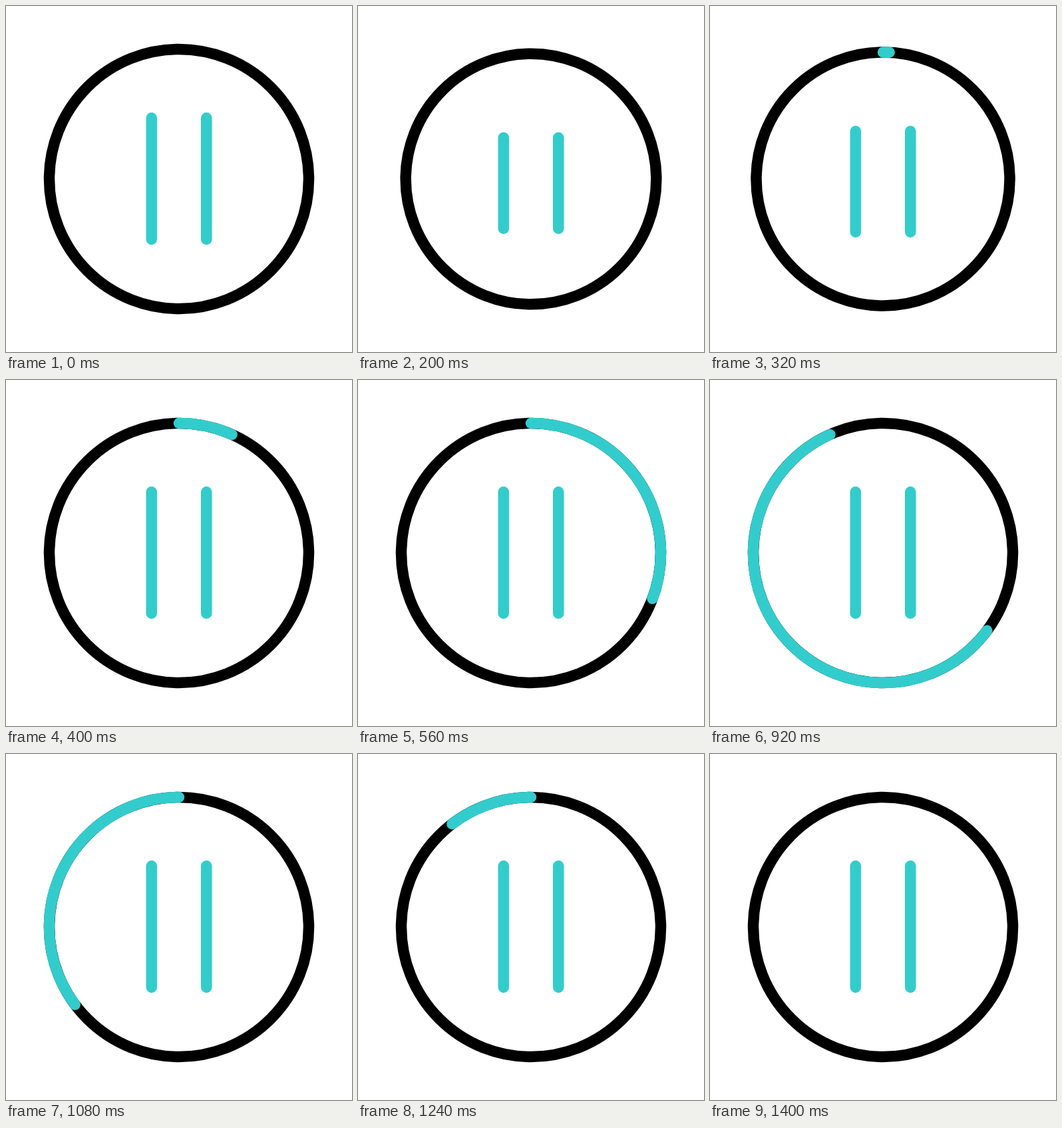
An HTML page that plays this animation: 520 by 520 pixels, repeating every 1.48 s.

```html
<!DOCTYPE html>
<html lang="en">
<head>
<meta charset="utf-8">
<title>Pause button</title>
<style>
  html, body { margin: 0; width: 100%; height: 100%; overflow: hidden; background: #fff; }
  svg { display: block; width: 100%; height: 100%; }
  path, circle { fill: none; stroke-width: 16.5; stroke-linecap: round; }
  .ring { stroke: #000; }
  .accent { stroke: #33cccc; }
</style>
</head>
<body>
<svg viewBox="0 0 520 520">
  <circle class="ring" id="ring" cx="260" cy="260" r="195"/>
  <path class="accent" id="arc"/>
  <path class="accent" id="bars"/>
</svg>
<script>
  const LOOP = 1480, STEP = 40, CENTER = 260, RADIUS = 195;
  const [ring, arc, bars] = ['ring', 'arc', 'bars'].map(id => document.getElementById(id));

  // Smooth ease from 0 to 1 between two times
  function ease(t, from, to) {
    const u = Math.min(1, Math.max(0, (t - from) / (to - from)));
    return u * u * (3 - 2 * u);
  }

  // Point on the ring, as a fraction of a turn clockwise from the top
  function point(turn, r) {
    const a = turn * 2 * Math.PI;
    return `${(CENTER + r * Math.sin(a)).toFixed(3)} ${(CENTER - r * Math.cos(a)).toFixed(3)}`;
  }

  function draw(t) {
    const press = ease(t, 120, 240) - ease(t, 240, 400);
    const r = RADIUS - 9 * press;
    ring.setAttribute('r', r);

    const head = ease(t, 280, 1040);
    const tail = ease(t, 600, 1400);
    const large = head - tail > 0.5 ? 1 : 0;
    arc.setAttribute('d', head > tail
      ? `M${point(tail, r)}A${r} ${r} 0 ${large} 1 ${point(head, r)}` : '');

    const top = 168.25 + 40 * press;
    const bottom = 350.75 - 22 * press;
    bars.setAttribute('d', [218.75, 301.25].map(x => `M${x} ${top}V${bottom}`).join(''));
  }

  const start = performance.now();
  function tick() {
    const t = (performance.now() - start) % LOOP;
    draw(Math.floor(t / STEP) * STEP);
    requestAnimationFrame(tick);
  }
  draw(0);
  requestAnimationFrame(tick);
</script>
</body>
</html>
```
